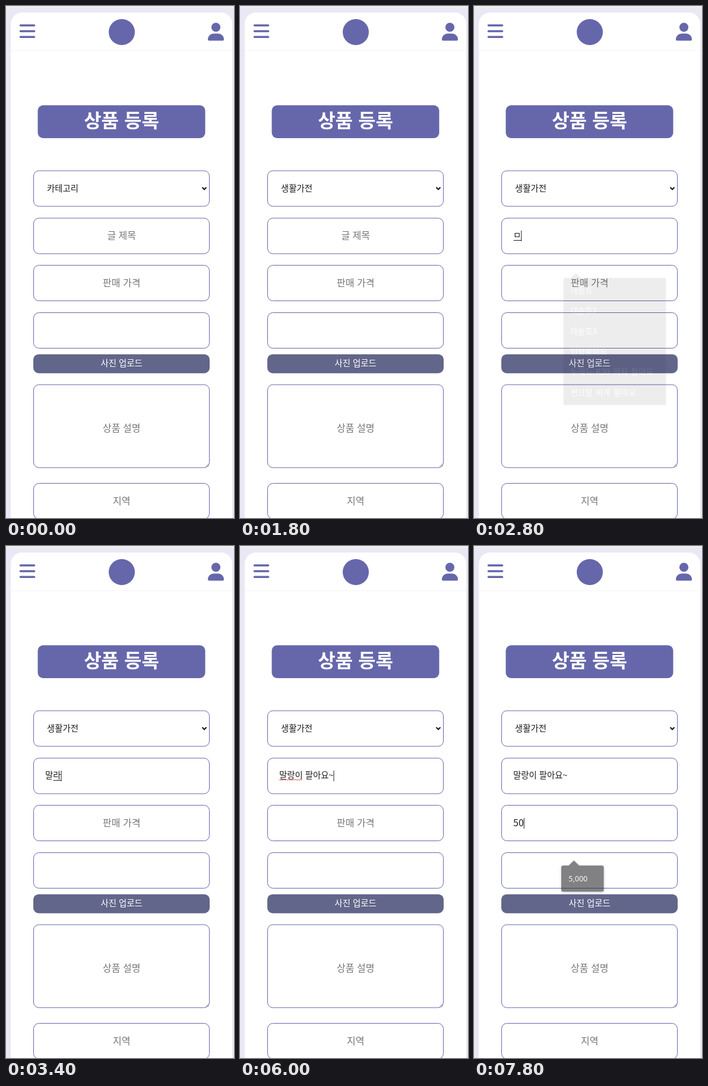
These frames come from a looping animation (384 px wide and 864 px high, 8000 ms). An HTML page:

```html
<!DOCTYPE html>
<html lang="ko">
<head>
<meta charset="utf-8">
<title>상품 등록</title>
<style>
  html, body { margin: 0; width: 100%; height: 100%; overflow: hidden; background: #e9e8f4; }
  svg { display: block; width: 384px; height: 864px; }
  text { font: 14.4px "Noto Sans CJK KR", "Noto Sans CJK", sans-serif; fill: #1c1c1e; white-space: pre; }
  .hint { font-size: 16px; fill: #757575; text-anchor: middle; }
  .field { fill: #fff; stroke: #6667ab; }
  .accent { fill: #6667ab; }
  .option { font-size: 15.2px; }
  .active { fill: #fff; font-weight: 500; }
  .menu { filter: drop-shadow(0 1px 2px rgba(0, 0, 0, .4)); }
  .menu rect, .menu path { fill: #27282c; }
  .menu text { fill: #f4f4f5; font-size: 14px; word-spacing: 2px; }
  .menu .number { font: 12.5px "Noto Sans", sans-serif; }
  .line { stroke: #1c1c1e; fill: none; }
</style>
</head>
<body>
<svg viewBox="0 0 384 864">
  <rect width="384" height="864" fill="#e9e8f4"/>
  <rect width="384" height="3" fill="#f0f0ee"/>
  <rect x="8" y="11" width="373" height="880" rx="19" fill="#fff"/>
  <path d="M8 75.5H381" stroke="#f4f4f6"/>
  <path d="M24.5 32.8H47.5M24.5 42.5H47.5M24.5 52.3H47.5" stroke="#6667ab" stroke-width="3.6" stroke-linecap="round"/>
  <circle class="accent" cx="195" cy="44" r="22"/>
  <circle class="accent" cx="353.5" cy="35.8" r="7.6"/>
  <path class="accent" d="M350.5 46.5H356.5C363 46.5 367 51 367 56.5Q367 58.6 365 58.6H342Q340 58.6 340 56.5C340 51 344 46.5 350.5 46.5Z"/>
  <rect class="accent" x="53.5" y="167.5" width="282" height="55.5" rx="9"/>
  <text x="194.5" y="205" text-anchor="middle" style="font-size:32px;font-weight:900;fill:#fff">상품 등록</text>

  <g id="fields"></g>
  <text id="category" x="69" y="313"></text>
  <path d="M330.5 306L334 309.5L337.5 306" stroke="#111" stroke-width="2" fill="none"/>
  <rect x="46" y="587.7" width="297" height="32" rx="9" fill="#62668a"/>
  <text x="194.7" y="608" text-anchor="middle" style="fill:#fff">사진 업로드</text>
  <path d="M336.5 777.5L341.5 772.5M339.5 777.5L341.5 775.5" stroke="#777" stroke-width=".8"/>

  <g id="hints">
    <text class="hint" x="194.7" y="393">글 제목</text>
    <text class="hint" x="194.7" y="473">판매 가격</text>
    <text class="hint" x="194.7" y="718">상품 설명</text>
    <text class="hint" x="194.7" y="841">지역</text>
  </g>
  <text id="title" x="66" y="392"></text>
  <text id="price" x="66" y="472.5" style="font-size:16px"></text>
  <path id="squiggle" fill="none" stroke="#e5303c"/>
  <path id="underline" class="line"/>
  <path id="caret" class="line"/>

  <g id="dropdown">
    <rect x="45" y="337" width="315" height="321" fill="#fff" style="filter:drop-shadow(0 1px 3px rgba(0,0,0,.4))"/>
    <rect id="highlight" x="45" width="315" height="32" fill="#c8c5c7"/>
    <path d="M360.2 338V658.2H45" fill="none" stroke="#111" stroke-width="1.6"/>
  </g>
  <g id="titleMenu" class="menu"></g>
  <g id="priceMenu" class="menu"></g>
</svg>
<script>
const LOOP = 8000, STEP = 200;
const $ = id => document.getElementById(id);
const show = (node, on) => node.style.display = on ? '' : 'none';

function add(parent, tag, attrs, text = '') {
  const node = document.createElementNS('http://www.w3.org/2000/svg', tag);
  for (const key in attrs) node.setAttribute(key, attrs[key]);
  node.textContent = text;
  return parent.appendChild(node);
}

for (const [y, height] of [[278, 60], [358, 60], [437.5, 60], [517.5, 60], [639, 140], [805.5, 60]])
  add($('fields'), 'rect', { class: 'field', x: 46.5, y, width: 296, height, rx: 9 });

const categories = ['카테고리', '디지털기기', '생활가전', '가구', '패션/잡화', '뷰티/미용', '스포츠', '취미/게임', '도서', '기타'];
const options = categories.map((name, i) => add($('dropdown'), 'text', { x: 69, y: 358.5 + 32 * i }, name));

function buildMenu(menu, y, width, items, textClass) {
  menu.replaceChildren();
  add(menu, 'path', { d: `M159 ${y + .5}L168.3 ${y - 8.5}L177.6 ${y + .5}Z` });
  add(menu, 'rect', { x: 147, y, width, height: 36 * items.length + 8, rx: 3 });
  items.forEach((item, i) => add(menu, 'text', { class: textClass, x: 159.3, y: y + 27 + 36 * i }, item));
}
const prices = ['5,000', '100,000', '123', '121,111', '10,000,000', '1,000,000'];
buildMenu($('titleMenu'), 454, 180,
  ['테슽흐', '테슽흐2', '테슽흐3', '인형팔아요', '누레도 K30 의자 팔아요', '썬크림 싸게 팔아요'], 'word');

const wave = Array.from({ length: 20 }, (_, i) => `${66 + 2 * i} ${i % 2 ? 395.5 : 393.5}`);
$('squiggle').setAttribute('d', 'M' + wave.join('L'));

// Each entry is one composition step of the input method.
const typing = ['ㅁ', '마', '말', '말라', '말랑', '말랑ㅇ', '말랑이', '말랑이 ', '말랑이 ㅍ', '말랑이 패',
  '말랑이 팔', '말랑이 팔ㅇ', '말랑이 팔아', '말랑이 팔아ㅇ', '말랑이 팔아요', '말랑이 팔아요~'];

function drawCaret(t, title) {
  const inPrice = t >= 6400;
  const field = inPrice ? $('price') : $('title');
  const end = 66 + (field.textContent ? field.getComputedTextLength() : 0) + .5;
  const y = inPrice ? 459 : 379;
  const focusedFor = t - (inPrice ? 6400 : 2000);
  show($('caret'), focusedFor >= 0 && (field.textContent || focusedFor % 1000 < 500));
  $('caret').setAttribute('d', `M${end} ${y}V${y + 18}`);

  const composing = !inPrice && /[ㄱ-힣]$/.test(title);
  show($('underline'), composing);
  if (composing) {
    const start = end - field.getSubStringLength(title.length - 1, 1);
    $('underline').setAttribute('d', `M${start} 395.5H${end}`);
  }
}

function render(t) {
  const open = t >= 600 && t < 1800;
  const hovered = t < 1600 ? 0 : 2;
  show($('dropdown'), open);
  $('highlight').setAttribute('y', 337 + 32 * hovered);
  options.forEach((option, i) => option.setAttribute('class', i === hovered ? 'option active' : 'option'));
  $('category').textContent = categories[t < 1800 ? 0 : 2];

  const title = t < 2800 ? '' : typing[Math.min((t - 2800) / STEP, typing.length - 1)];
  const price = t < 7600 ? '' : t < 7800 ? '5' : '50';
  $('title').textContent = title;
  $('price').textContent = price;
  show($('hints').children[0], !title);
  show($('hints').children[1], !price);
  show($('squiggle'), t >= 4200 && t < 6400);

  show($('titleMenu'), t >= 2200 && t < 3000);
  const fading = t >= 2800;
  $('titleMenu').style.opacity = fading ? .08 : 1;
  $('titleMenu').setAttribute('transform', fading ? 'translate(237 566) scale(.956) translate(-237 -566)' : '');

  show($('priceMenu'), t >= 6600);
  buildMenu($('priceMenu'), 539.3, price ? 71.5 : 96, price ? prices.slice(0, 1) : prices, 'number');
  $('priceMenu').style.opacity = t >= 7800 ? .58 : 1;
  drawCaret(t, title);
}

let last = -1;
function tick() {
  const t = Math.floor(performance.now() % LOOP / STEP) * STEP;
  if (t !== last) render(last = t);
  requestAnimationFrame(tick);
}
tick();
</script>
</body>
</html>
```
